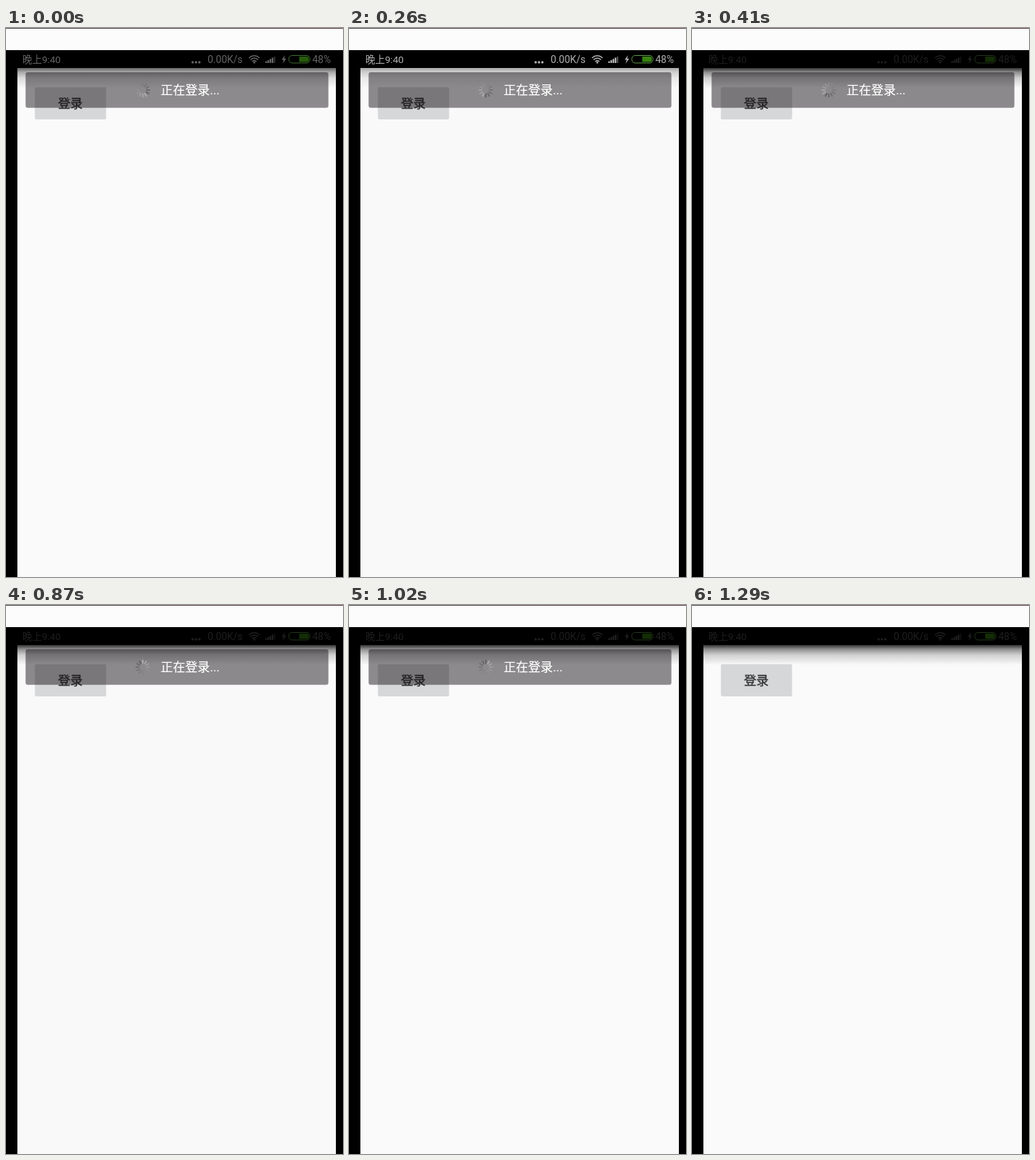
Write an HTML page that moves like this. It is 473 px wide and 769 px high and loops after 2.66 s.

```html
<!DOCTYPE html>
<html lang="zh-CN">
<head>
<meta charset="utf-8">
<style>
html, body { margin: 0; width: 100%; height: 100%; overflow: hidden; background: #fcfcfc; }
svg { display: block; width: 473px; height: 769px; }
text { font-family: Roboto, "Noto Sans CJK SC", "Noto Sans CJK", sans-serif; }
</style>
</head>
<body>
<svg viewBox="0 0 473 769" xmlns="http://www.w3.org/2000/svg">
  <defs>
    <linearGradient id="fade" x2="0" y2="1">
      <stop offset="0" stop-opacity=".8"/>
      <stop offset=".21" stop-opacity=".43"/>
      <stop offset=".5" stop-opacity=".17"/>
      <stop offset="1" stop-opacity="0"/>
    </linearGradient>
    <linearGradient id="edge">
      <stop offset="0" stop-color="#4a4648"/>
      <stop offset="1" stop-color="#5c3a40"/>
    </linearGradient>
  </defs>
  <rect width="473" height="769" fill="#fcfcfc"/>
  <rect width="473" height="1" fill="url(#edge)"/>
  <rect y="31" width="473" height="738" fill="#000"/>
  <rect id="page" x="16" y="56" width="447" height="713" fill="#fafafa"/>
  <rect id="shade" x="16" y="56" width="447" height="28" fill="url(#fade)"/>

  <g id="status" font-size="14" fill="#b8b8b8">
    <text x="23" y="49" font-size="13.7">晚上9:40</text>
    <circle cx="262" cy="48" r="1.7"/>
    <circle cx="266.7" cy="48" r="1.7"/>
    <circle cx="271.4" cy="48" r="1.7"/>
    <text x="283" y="49">0.00K/s</text>
    <path d="M341 42Q348.5 35.5 356 42M343.2 44.5Q348.5 40 353.8 44.5M345.5 47Q348.5 44.4 351.5 47"
          fill="none" stroke="#b8b8b8" stroke-width="1.6"/>
    <circle cx="348.5" cy="48.4" r="1.3"/>
    <path d="M364 46.5h2.3v2.5h-2.3zM367 45h2.3v4h-2.3zM370 43.3h2.3v5.7h-2.3zM373 41.6h2.3v7.4h-2.3z"/>
    <path d="M376 40h2v9h-2z" opacity=".45"/>
    <path d="M391.5 38L387 44.6H389.8L388.2 50L393.2 43H390.4Z"/>
    <text x="430" y="49">48%</text>
  </g>
  <g id="battery">
    <rect x="397" y="38.5" width="29.5" height="10.5" rx="4.5" fill="none" stroke="#5f9a48"/>
    <path d="M411.5 40H422.5Q425 40 425 42.5V45Q425 47.5 422.5 47.5H411.5Z" fill="#378210"/>
  </g>

  <rect x="40.5" y="83" width="100" height="45" rx="2" fill="#d6d7d8"/>
  <text x="73" y="112" font-size="17.3" font-weight="500" fill="#333" stroke="#333" stroke-width=".4">登录</text>

  <g id="toast">
    <rect x="27.5" y="62" width="425" height="49.7" rx="3" fill="#100c10" fill-opacity=".47"/>
    <g id="spinner" stroke-width="2" stroke-linecap="round"></g>
    <text x="217" y="93" font-size="17.3" fill="#fff" stroke="#fff" stroke-width=".2">正在登录...</text>
  </g>
</svg>
<script>
const LOOP = 2660, SPOKES = 12;
const $ = id => document.getElementById(id);

// Each row: start time, spinner head in degrees
const heads = [[0, 120], [140, 150], [260, 180], [410, 210], [560, 240],
               [720, 300], [870, 330], [1020, 0], [1140, 30]];
// Each row: start time, opacity of status text, battery and shade
const lights = [[0, .55, .7, .75], [140, .76, .85, .55], [260, .97, 1, .4], [410, .16, .35, 1]];

const at = (steps, t) => steps.filter(s => s[0] <= t).pop();

const spokes = Array.from({ length: SPOKES }, (_, i) => {
  const line = document.createElementNS('http://www.w3.org/2000/svg', 'line');
  line.setAttribute('y1', -5.5);
  line.setAttribute('y2', -9.5);
  line.setAttribute('transform', `translate(192 87) rotate(${i * 30})`);
  return $('spinner').appendChild(line);
});

function draw(t) {
  const head = at(heads, t)[1] / 30;
  spokes.forEach((line, i) => {
    const lag = (head - i + SPOKES) % SPOKES;
    const grey = Math.round(98 + 74 * lag / (SPOKES - 1));
    line.setAttribute('stroke', `rgb(${grey},${grey},${grey})`);
  });
  const opacity = at(lights, t).slice(1);
  ['status', 'battery', 'shade'].forEach((id, i) => $(id).setAttribute('opacity', opacity[i]));
  $('page').setAttribute('fill', t >= 140 && t < 1020 ? '#f9f9f9' : '#fafafa');
  $('toast').setAttribute('visibility', t < 1290 ? 'visible' : 'hidden');
}

const start = performance.now();
function tick() {
  draw((performance.now() - start) % LOOP);
  requestAnimationFrame(tick);
}
tick();
</script>
</body>
</html>
```
